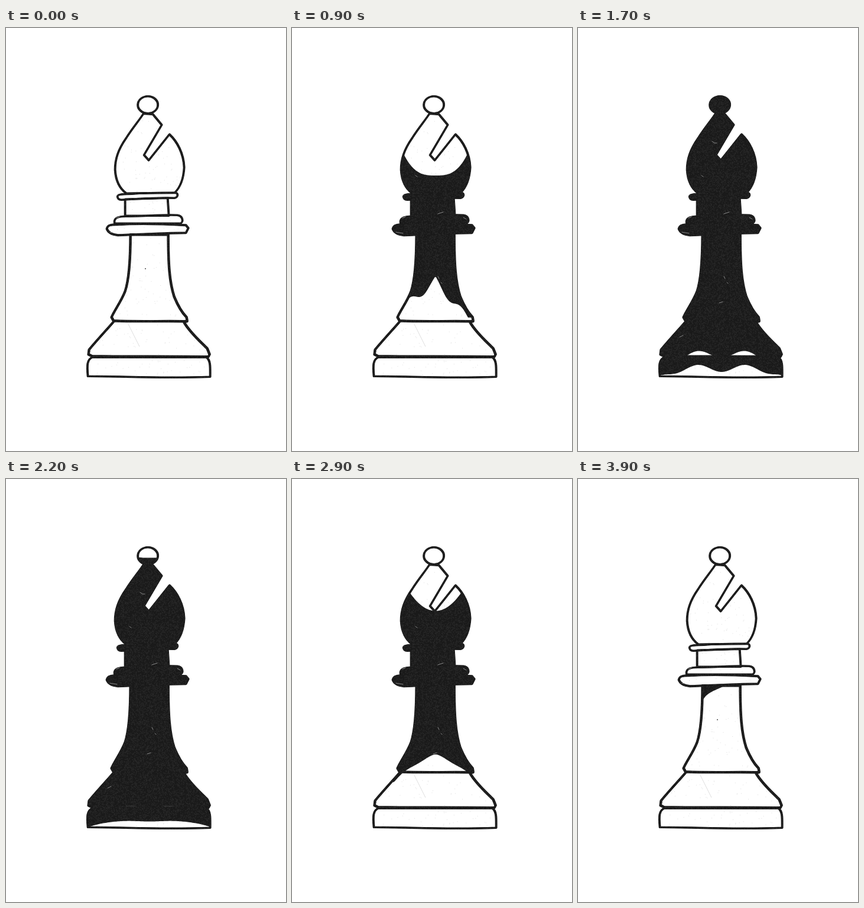
Animation of 474x717 px, one loop 4000 ms. Source, as an HTML page with a canvas:

```html
<!DOCTYPE html>
<html lang="en">
<head>
<meta charset="utf-8">
<title>Chess bishop in ink</title>
<style>
  html, body { margin: 0; width: 100%; height: 100%; overflow: hidden; background: #fff; }
  canvas { display: block; }
</style>
</head>
<body>
<canvas id="stage" width="474" height="717"></canvas>
<script>
const W = 474, H = 717, LOOP = 4000, STEP = 100, AXIS = 243, INK = '#1a1a1a';
const ctx = document.getElementById('stage').getContext('2d');

// An ink edge: height at the axis, half width, and how far its sides reach, bend, drip and tilt.
const edge = (t, mid, more) =>
  ({ t, mid, half: 60, reach: 0, bend: 3, drip: 0, tilt: 0, ...more });

// Ink that floods from one height to another, stays, and drains back.
const pool = (empty, full, fill, filled, drain, drained) =>
  [edge(fill, empty), edge(filled, full), edge(drain, full), edge(drained, empty)];

const parts = [
  {
    shape: 'M223.5 130A17 14.5 0 0 1 257.5 130A17 14.5 0 0 1 223.5 130Z' +
      'M233 145C226 156 214 170 204 186C190 206 185 222 185 240C186 258 193 272 204 280' +
      'L286 279C297 268 301 254 302 236C301 212 290 192 277 180L242 224L234 215L264 164L249 146Z',
    pen: 3.2,
    rising: true,
    edges: [
      edge(.1, 283),
      edge(.4, 279, { reach: -25 }),
      edge(.9, 250, { reach: -50 }),
      edge(1.2, 220, { reach: -50, bend: 2 }),
      edge(1.6, 112),
      edge(2, 112),
      edge(2.5, 166, { half: 20, reach: -20, bend: 2 }),
      edge(3, 238, { reach: -50, bend: 2 }),
      edge(3.3, 264, { reach: -60, bend: 4 }),
      edge(3.7, 283)
    ]
  },
  {
    shape: 'M189 285C190 281 200 281 214 281C235 279 262 279 288 279C292 281 292 286 286 288' +
      'C262 287 228 289 196 291C191 291 189 288 189 285Z',
    pen: 3,
    edges: pool(278, 294, .4, .7, 3.4, 3.8)
  },
  {
    shape: 'M202 290L202 318L276 318L274 288Z',
    pen: 3.2,
    edges: [
      edge(.1, 288),
      edge(.4, 296, { half: 38, reach: 24, bend: 6, drip: 4 }),
      edge(.6, 320),
      edge(3.4, 320),
      edge(3.8, 288)
    ]
  },
  {
    shape: 'M184 329C183 322 190 319 203 319C232 319 262 316 290 317C300 318 301 328 296 331' +
      'C262 331 220 331 184 331Z',
    pen: 3,
    edges: pool(316, 334, .4, .7, 3.5, 3.8)
  },
  {
    shape: 'M171 340C172 334 177 333 188 333C224 331 268 332 305 334L309 339L305 347' +
      'C276 347 224 350 190 351C180 350 173 346 171 340Z',
    pen: 3.4,
    edges: pool(330, 353, .3, .65, 3.1, 3.7)
  },
  {
    shape: 'M211 350C211 395 209 425 202 446C195 464 184 478 179 490L183 497' +
      'C172 510 155 528 141 545L140 553L146 556C200 557 270 556 343 557L345 553L341 543' +
      'C328 530 312 516 302 499L307 496L306 490C298 482 292 472 285 455C277 430 275 400 275 350Z' +
      'M183 496C225 498 265 496 307 497',
    pen: 3.8,
    edges: [
      edge(.1, 349, { half: 36 }),
      edge(.4, 374, { half: 36, reach: 45, drip: 5 }),
      edge(.9, 426, { half: 55, reach: 54, bend: .8, drip: -6, tilt: 10 }),
      edge(1.2, 508, { half: 85, reach: 22, drip: 4 }),
      edge(1.7, 553, { half: 100, reach: 20, bend: 4, drip: 6 }),
      edge(1.8, 562, { half: 100 }),
      edge(2.1, 562, { half: 100 }),
      edge(2.5, 535, { half: 72, reach: 25, bend: 4, drip: 3.5 }),
      edge(3, 452, { half: 70, reach: 50, bend: .9, drip: -3 }),
      edge(3.3, 394, { half: 44, reach: 58, bend: 1.1, drip: -4, tilt: 12 }),
      edge(3.9, 353, { half: 36, reach: 14, bend: 5, tilt: -16 }),
      edge(4, 349, { half: 36 })
    ]
  },
  {
    shape: 'M146 558C138 562 137 570 139 590C200 590 260 594 346 591C346 575 347 564 340 558Z',
    pen: 3.2,
    edges: [
      edge(1.3, 555, { half: 100 }),
      edge(1.7, 577, { half: 100, reach: 12, bend: 6, drip: 6 }),
      edge(1.8, 600, { half: 100 }),
      edge(1.9, 600, { half: 100 }),
      edge(2.5, 560, { half: 100, reach: 18, bend: 6, drip: 1 }),
      edge(2.7, 555, { half: 100 })
    ]
  }
];
for (const p of parts) p.path = new Path2D(p.shape);

const scratches = new Path2D('M227 192l4 3 4 0M247 315l9-3M247 421l2 4M252 431l2 2' +
  'M239 466l6-2M209 250l3 2M187 322l5-2M290 321l5 3M176 346l12 2M172 524l6-3');

let seed = 7;
const rnd = () => (seed = seed * 16807 % 2147483647) / 2147483647;

function layer(paint) {
  const c = document.createElement('canvas');
  c.width = W;
  c.height = H;
  paint(c.getContext('2d'));
  return c;
}

function scatter(g, count, size, color, keep = () => true) {
  g.fillStyle = color;
  while (count--) {
    const x = 130 + rnd() * 225, y = 110 + rnd() * 490;
    if (keep(x, y)) g.fillRect(x, y, size, size);
  }
}

const grain = layer(g => scatter(g, 22000, 1.3, '#2b2b2b'));

const paper = layer(g => {
  g.fillStyle = '#fff';
  g.fillRect(0, 0, W, H);
  scatter(g, 700, 1, '#ddd', (x, y) => parts.some(p => g.isPointInPath(p.path, x, y)));
  g.strokeStyle = '#ddd';
  g.stroke(new Path2D('M207 502L226 540'));
  g.fillStyle = '#777';
  g.fillRect(235, 407, 2, 2);
});

function edgeAt(edges, t) {
  const i = edges.findIndex(e => e.t > t);
  if (i === 0) return edges[0];
  if (i < 0) return edges[edges.length - 1];
  const a = edges[i - 1], b = edges[i], f = (t - a.t) / (b.t - a.t);
  const mix = {};
  for (const k in a) mix[k] = a[k] + (b[k] - a[k]) * f;
  return mix;
}

function edgeY(e, x) {
  const n = Math.max(-1, Math.min(1, (x - AXIS) / e.half));
  return e.mid + e.reach * Math.abs(n) ** e.bend + e.drip * Math.cos(8 * n) + e.tilt * n;
}

function fillInk(part, t) {
  const e = edgeAt(part.edges, t);
  const far = part.rising ? H : 0;
  ctx.save();
  ctx.clip(part.path);
  ctx.beginPath();
  ctx.moveTo(0, far);
  for (let x = 0; x <= W; x += 2) ctx.lineTo(x, edgeY(e, x));
  ctx.lineTo(W, far);
  ctx.fill();
  ctx.restore();
}

// Two slightly shifted passes give the line an uneven weight.
function outline(part) {
  ctx.lineWidth = part.pen;
  ctx.stroke(part.path);
  ctx.save();
  ctx.translate(-.7, .5);
  ctx.stroke(part.path);
  ctx.restore();
}

function draw(t) {
  ctx.drawImage(paper, 0, 0);
  ctx.fillStyle = ctx.strokeStyle = INK;
  ctx.lineCap = ctx.lineJoin = 'round';
  for (const p of parts) {
    fillInk(p, t);
    outline(p);
  }
  ctx.globalCompositeOperation = 'lighten';
  ctx.drawImage(grain, 0, 0);
  ctx.strokeStyle = '#888';
  ctx.lineWidth = 1;
  ctx.stroke(scratches);
  ctx.globalCompositeOperation = 'source-over';
}

let shown = -1;
function tick() {
  const step = Math.floor(performance.now() % LOOP / STEP);
  if (step !== shown) draw(step * STEP / 1000);
  shown = step;
  requestAnimationFrame(tick);
}
tick();
</script>
</body>
</html>
```
